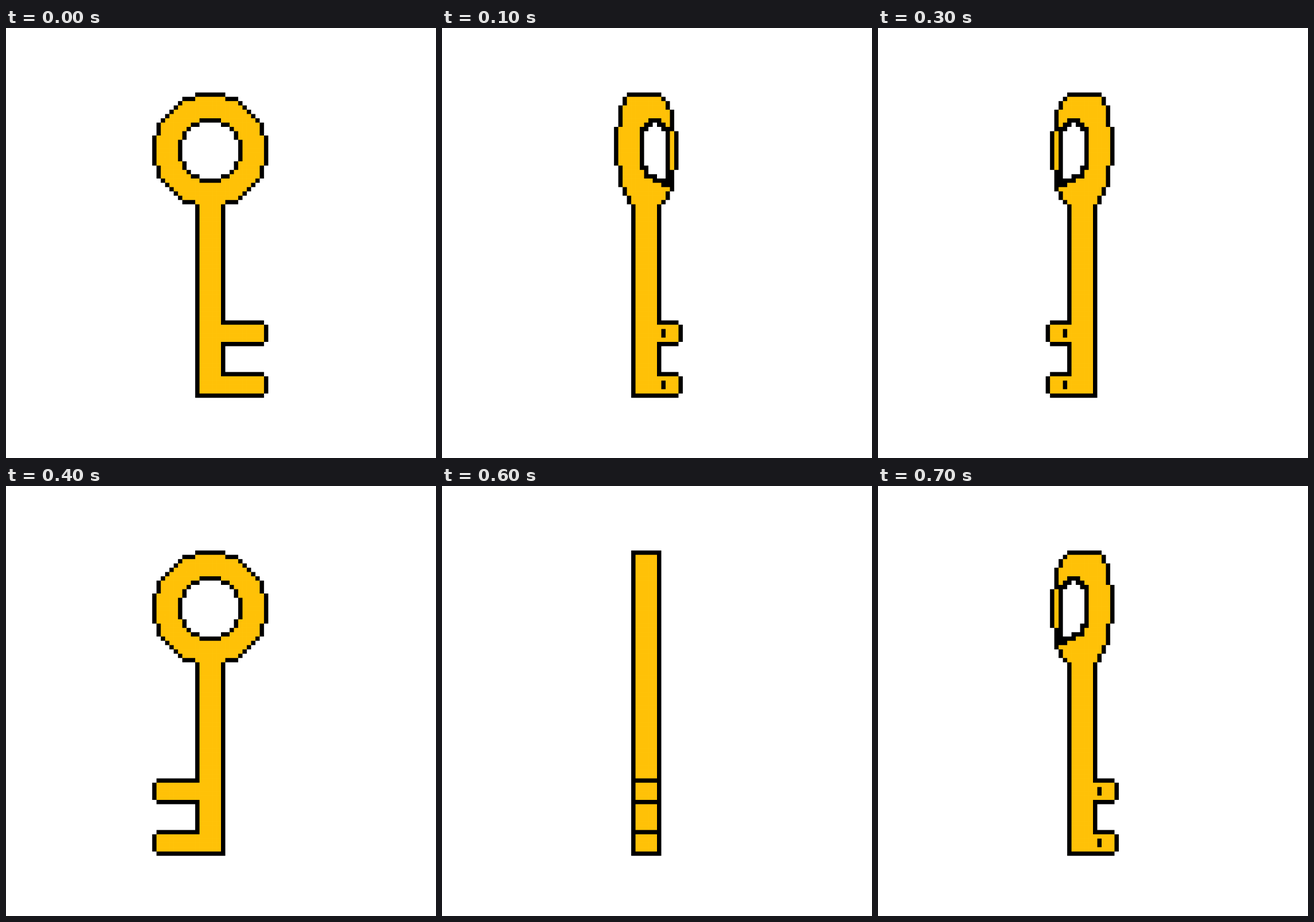
These frames come from a looping animation (748 by 748 pixels, 0.8 s). An HTML page with a canvas:

```html
<!DOCTYPE html>
<html lang="en">
<head>
<meta charset="utf-8">
<title>Spinning pixel key</title>
<style>
  html, body { margin: 0; width: 100%; height: 100%; overflow: hidden; background: #fff; }
  canvas { display: block; width: 748px; height: 748px; }
</style>
</head>
<body>
<canvas id="stage" width="748" height="748"></canvas>
<script>
const N = 100, SIZE = 748, CELL = SIZE / N, STEP = 100;
const MID = 47, RING_Y = 28, TOP = 15, NECK = 41, BOTTOM = 85;
const SHAFT_L = 44, SHAFT_R = 50, TOOTH_ROWS = [68, 80];
const GOLD = '#ffc107', INK = '#000';
const ctx = document.getElementById('stage').getContext('2d');

// Grid of cells: body is the silhouette, ink adds dark cells to its outline.
class Grid {
  body = new Uint8Array(N * N);
  ink = new Uint8Array(N * N);
  place = x => x;

  // Columns set from here on are mirrored about MID and moved by shift.
  turn(dir, shift = 0) {
    this.place = x => MID + dir * (x - MID) + shift;
  }
  // Columns x0..x1 and rows y0..y1, all inclusive.
  fill(layer, x0, x1, y0, y1 = y0, value = 1) {
    for (let y = y0; y <= y1; y++)
      for (let x = x0; x <= x1; x++) this[layer][y * N + this.place(x)] = value;
  }
  isDark(i) {
    const b = this.body;
    return this.ink[i] || !(b[i - 1] && b[i + 1] && b[i - N] && b[i + N]);
  }
  // Adding partial coverage keeps shared cell edges free of seams.
  draw() {
    ctx.clearRect(0, 0, SIZE, SIZE);
    ctx.globalCompositeOperation = 'lighter';
    this.body.forEach((on, i) => {
      if (!on) return;
      ctx.fillStyle = this.isDark(i) ? INK : GOLD;
      ctx.fillRect(i % N * CELL, Math.floor(i / N) * CELL, CELL, CELL);
    });
  }
}

// Half the chord of an ellipse at distance d from its centre.
const chord = (d, across, along) => along * Math.sqrt(Math.max(0, 1 - (d / across) ** 2));

function disc(g, square, value) {
  const r = Math.sqrt(square), rows = Math.floor(r);
  for (let d = -rows; d <= rows; d++) {
    const w = Math.floor(Math.sqrt(square - d * d));
    g.fill('body', MID - w, MID + w, RING_Y + d, RING_Y + d, value);
  }
}

function flatHead(g) {
  disc(g, 180, 1);
  disc(g, 42, 0);
}

// A narrow ellipse swept across the shaft, with a slanted hole near one rim.
function tiltHead(g) {
  const reach = d => Math.floor(chord(d, 13.2, 4.25));
  for (let y = TOP; y <= NECK; y++)
    g.fill('body', SHAFT_L - reach(y - 27.2), SHAFT_R + reach(y - 28.1), y);

  for (let x = 47; x <= 51; x++) {
    const dx = x - 49.4, cy = 28.11 + 0.4 * dx, h = chord(dx, 3.2, 6.08);
    const y0 = Math.ceil(cy - h), y1 = Math.floor(cy + h);
    g.fill('body', x, x, y0, y1, 0);
    g.fill('ink', x - 1, x + 1, y0 - 1, y1 + 1);
    g.fill('ink', x + 1, x + 1, y0, y1 + 2);
  }
}

function shaft(g, top) {
  g.fill('body', SHAFT_L, SHAFT_R, top, BOTTOM);
}

function teeth(g, tip, notched) {
  for (const y of TOOTH_ROWS) {
    g.fill('body', SHAFT_R, tip - 1, y, y + 5);
    g.fill('body', tip, tip, y + 1, y + 4);
    g.fill('ink', SHAFT_R, SHAFT_R, y);
    if (y + 5 < BOTTOM) g.fill('ink', SHAFT_R, SHAFT_R, y + 5);
    if (notched) g.fill('ink', SHAFT_R + 1, SHAFT_R + 1, y + 2, y + 3);
  }
}

function flat(toothDir) {
  const g = new Grid();
  flatHead(g);
  shaft(g, NECK);
  g.turn(toothDir);
  teeth(g, 60, false);
  return g;
}

function tilt(headDir, toothDir, shift) {
  const g = new Grid();
  g.turn(headDir, shift);
  tiltHead(g);
  g.turn(toothDir);
  shaft(g, NECK + 1);
  teeth(g, 55, true);
  return g;
}

function edgeOn(teethInFront) {
  const g = new Grid();
  shaft(g, TOP);
  if (teethInFront)
    for (const y of TOOTH_ROWS)
      for (const row of [y, y + 5]) g.fill('ink', SHAFT_L, SHAFT_R, row);
  return g;
}

const poses = [
  flat(1), tilt(1, 1), edgeOn(false), tilt(-1, -1),
  flat(-1), tilt(1, -1, -1), edgeOn(true), tilt(-1, 1)
];

const start = performance.now();
let shown = -1;
function tick() {
  const pose = Math.floor((performance.now() - start) / STEP) % poses.length;
  if (pose !== shown) poses[shown = pose].draw();
  requestAnimationFrame(tick);
}
tick();
</script>
</body>
</html>
```
